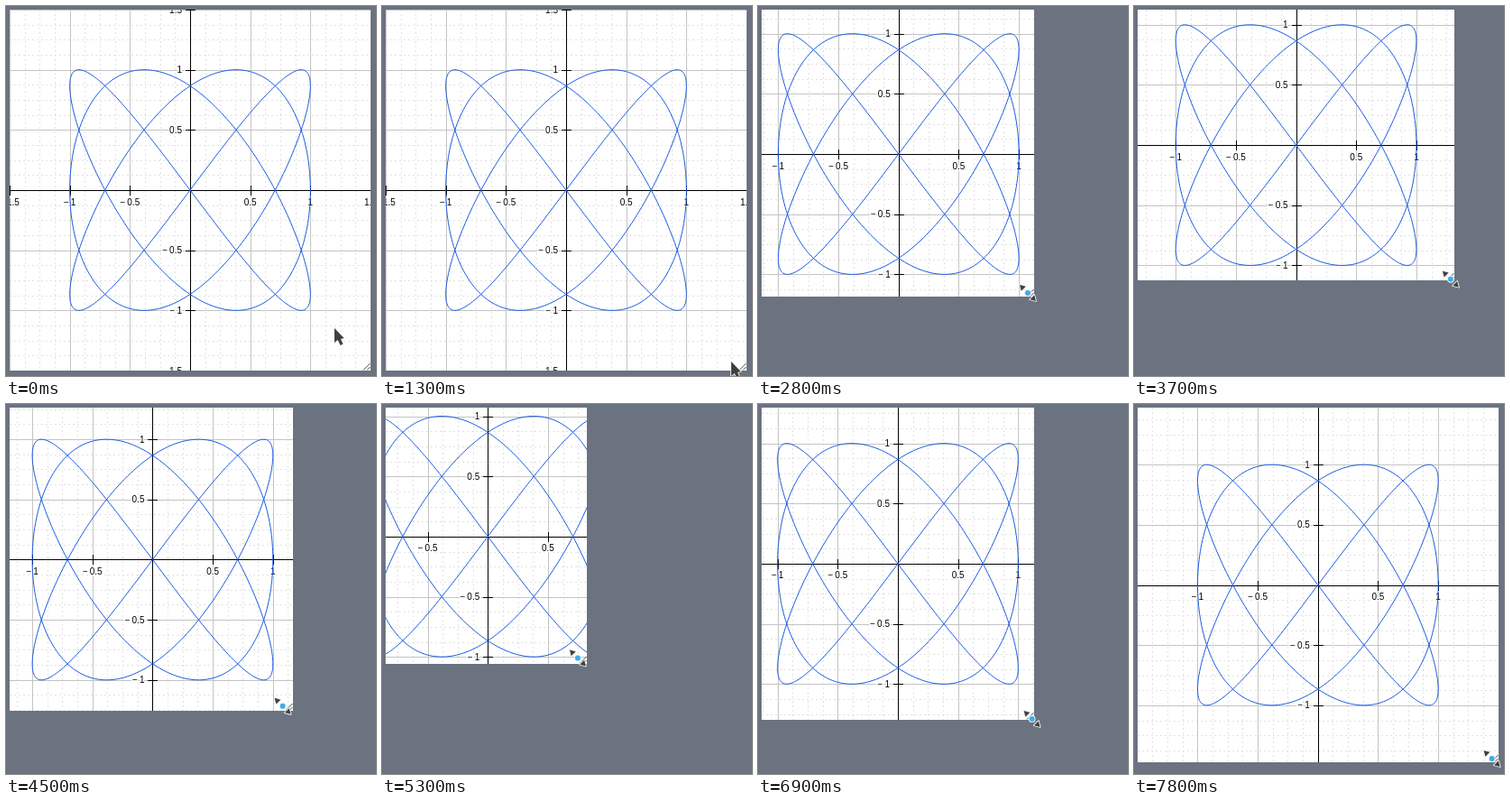
Recreate the animation shown at these times as an HTML page with a canvas. Size 410x410 px, loop 8000 ms.

```html
<!DOCTYPE html>
<html lang="en">
<head>
<meta charset="utf-8">
<title>Resizable plot</title>
<style>
  html, body { margin: 0; width: 100%; height: 100%; overflow: hidden; background: #6b7280; }
  canvas { display: block; width: 410px; height: 410px; }
</style>
</head>
<body>
<canvas id="stage" width="410" height="410"></canvas>
<script>
const ctx = document.getElementById('stage').getContext('2d');
const LOOP = 8000, STEP = 100, EDGE = 4, UNIT = 400 / 3;
const PLOT_LAG = 33, CURSOR_LEAD = 40;

// Drags of the panel corner: each bends from the last end point to the next.
const home = { x: 404, y: 404 };
const drags = [
  { from: 1950, to: 2780, bend: { x: 353.5, y: 390.5 }, end: { x: 306, y: 322 } },
  { from: 3050, to: 4000, bend: { x: 345, y: 269 }, end: { x: 375, y: 333 } },
  { from: 4000, to: 4850, bend: { x: 320, y: 357 }, end: { x: 286, y: 320 } },
  { from: 4850, to: 5690, bend: { x: 215, y: 284 }, end: { x: 205, y: 270 } },
  { from: 6050, to: 7765, bend: { x: 309.4, y: 367.6 }, end: { x: 403.6, y: 397 } }
];

const progress = (t, from, to) => Math.min(1, Math.max(0, (t - from) / (to - from)));
const lerp = (a, b, k) => a + (b - a) * k;
const mix = (p, q, k) => ({ x: lerp(p.x, q.x, k), y: lerp(p.y, q.y, k) });

function cornerAt(t) {
  let p = home;
  for (const { from, to, bend, end } of drags) {
    if (t <= from) break;
    const k = progress(t, from, to);
    p = mix(mix(p, bend, k), mix(bend, end, k), k);
  }
  return p;
}

function line(x0, y0, x1, y1) {
  ctx.moveTo(x0, y0);
  ctx.lineTo(x1, y1);
}

function strokeLines(color, dash, add) {
  ctx.strokeStyle = color;
  ctx.lineWidth = 1;
  ctx.setLineDash(dash);
  ctx.beginPath();
  add();
  ctx.stroke();
  ctx.setLineDash([]);
}

function label(value, x, y, align) {
  const digits = String(Math.abs(value)), minus = value < 0 ? '\u2212' : '';
  const dw = ctx.measureText(digits).width;
  const mw = minus ? ctx.measureText(minus).width + 2 : 0;
  const left = align === 'center' ? x - (dw + mw) / 2 : x - dw - mw;
  const parts = [[minus, left], [digits, left + mw]];
  ctx.strokeStyle = '#fff';
  ctx.lineWidth = 3;
  for (const [s, px] of parts) ctx.strokeText(s, px, y);
  ctx.fillStyle = '#000';
  for (const [s, px] of parts) ctx.fillText(s, px, y);
}

function drawPlot(corner, center) {
  const right = Math.round(corner.x), bottom = Math.round(corner.y);
  const toX = v => center.x + v * UNIT, toY = v => center.y - v * UNIT;
  const snap = v => Math.round(v) + 0.5;
  const px = v => snap(toX(v)), py = v => snap(toY(v));
  const steps = (length, size) => {
    const n = Math.floor((length - EDGE) / 2 / UNIT / size);
    return Array.from({ length: 2 * n + 1 }, (_, i) => (i - n) * size).filter(v => v);
  };
  const xTicks = steps(corner.x, 0.5), yTicks = steps(corner.y, 0.5);
  const column = v => line(px(v), EDGE, px(v), bottom);
  const row = v => line(EDGE, py(v), right, py(v));

  ctx.save();
  ctx.beginPath();
  ctx.rect(EDGE, EDGE, right - EDGE, bottom - EDGE);
  ctx.clip();
  ctx.fillStyle = '#fff';
  ctx.fillRect(EDGE, EDGE, right, bottom);

  const minor = v => v % 0.5 !== 0;
  strokeLines('#e2e2e2', [2, 3], () => {
    steps(corner.x, 0.125).filter(minor).forEach(column);
    steps(corner.y, 0.125).filter(minor).forEach(row);
  });
  strokeLines('#c4c4c4', [], () => {
    xTicks.forEach(column);
    yTicks.forEach(row);
  });
  strokeLines('#000', [], () => {
    column(0);
    row(0);
    for (const v of xTicks) line(px(v), py(0) - 5.5, px(v), py(0) + 5.5);
    for (const v of yTicks) line(px(0) - 5.5, py(v), px(0) + 5.5, py(v));
  });

  ctx.font = '10px "Liberation Sans", Arial, sans-serif';
  ctx.lineJoin = 'round';
  for (const v of xTicks) label(v, toX(v), Math.floor(center.y) + 17, 'center');
  for (const v of yTicks) label(v, center.x - 9, Math.floor(toY(v)) + 4, 'right');

  strokeLines('#1a5ae0', [], () => {
    for (let i = 0; i <= 720; i++) {
      const a = i * Math.PI / 360;
      ctx.lineTo(toX(Math.sin(3 * a)), toY(Math.sin(4 * a)));
    }
  });

  strokeLines('#444', [], () => {
    for (const size of [8, 4]) line(right - size, bottom - 0.5, right - 0.5, bottom - size);
  });
  ctx.restore();
}

function polygon(points) {
  ctx.beginPath();
  for (const [x, y] of points) ctx.lineTo(x, y);
  ctx.closePath();
  ctx.stroke();
  ctx.fill();
}

function beginCursor({ x, y }) {
  ctx.save();
  ctx.translate(x, y);
  ctx.lineJoin = 'round';
  ctx.lineWidth = 1.8;
  ctx.strokeStyle = '#f4f4f4';
  ctx.fillStyle = '#404040';
}

function drawPointer(pos) {
  beginCursor(pos);
  polygon([[0, 0], [0, 16], [3.6, 13], [6.6, 19], [9.4, 17.6], [7, 12], [10.5, 11]]);
  ctx.restore();
}

function drawResize(pos) {
  beginCursor(pos);
  for (const s of [-1, 1]) {
    polygon([[9 * s, 9 * s], [2.3 * s, 7.2 * s], [7.2 * s, 2.3 * s]]);
  }
  ctx.beginPath();
  ctx.arc(0, 0, 3, 0, 2 * Math.PI);
  ctx.stroke();
  ctx.fillStyle = '#3daee9';
  ctx.fill();
  ctx.restore();
}

function draw(t) {
  const corner = cornerAt(t), late = cornerAt(t - PLOT_LAG);
  // The plot follows a shrinking panel a little late.
  const middle = k => (EDGE + Math.max(corner[k], late[k])) / 2;

  ctx.fillStyle = '#6b7280';
  ctx.fillRect(0, 0, 410, 410);
  drawPlot(corner, { x: middle('x'), y: middle('y') });

  if (t < 1400) {
    drawPointer(mix({ x: 364, y: 357 }, { x: 387, y: 394 }, progress(t, 350, 1300)));
  } else {
    const grab = cornerAt(t + CURSOR_LEAD), away = 1 - progress(t, 1400, 1600);
    drawResize({ x: grab.x - 7 - 4 * away, y: grab.y - 4 - 3 * away });
  }
}

const start = performance.now();
function tick() {
  const t = (performance.now() - start) % LOOP;
  draw(Math.floor(t / STEP) * STEP);
  requestAnimationFrame(tick);
}
tick();
</script>
</body>
</html>
```
